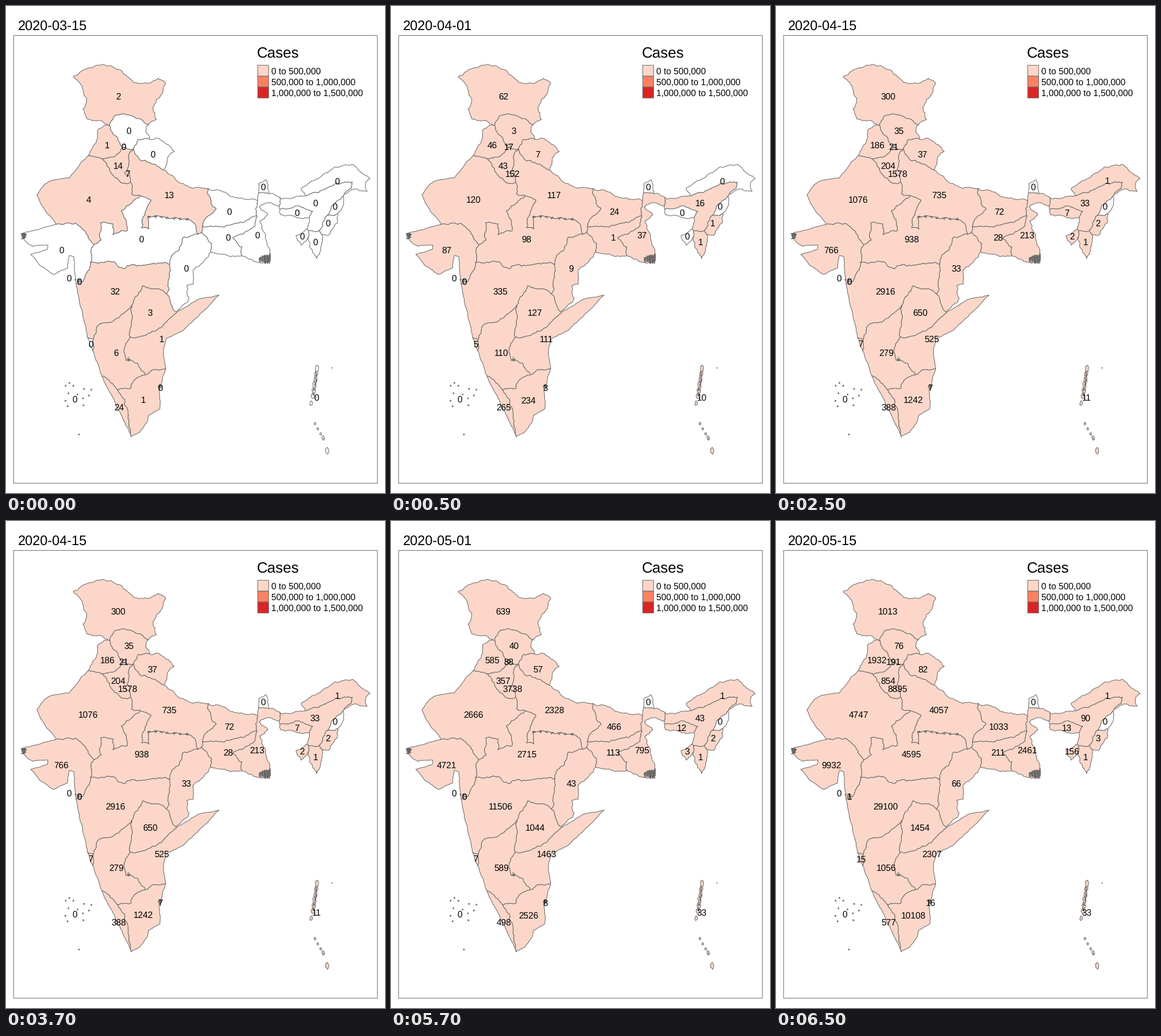
A matplotlib script for the animation above (8000 ms loop, 660x849 px).

```python
import numpy as np
import matplotlib.pyplot as plt
from matplotlib.animation import FuncAnimation
from matplotlib.patches import Polygon, Rectangle

W, H, DPI = 660, 849, 64
PX = 72 / DPI
EDGE = "#666666"
LOW, MID, HIGH = "#fcd7c9", "#fb8161", "#d92523"
DATES = ["2020-03-15", "2020-04-01", "2020-04-15", "2020-05-01", "2020-05-15"]

plt.rcParams.update({"font.family": "Liberation Sans", "text.hinting": "no_hinting",
                     "path.simplify": False})
rng = np.random.default_rng(4)
fig = plt.figure(figsize=(W / DPI, H / DPI), dpi=DPI, facecolor="white")
ax = fig.add_axes([0, 0, 1, 1])
ax.set(xlim=(0, W), ylim=(H, 0))
ax.axis("off")
regions = []


def border(*flat, rough=0.16):
    """Fractal line: midpoints are pushed sideways until the pieces are short."""
    pts = list(np.array(flat, float).reshape(-1, 2))
    while True:
        out = pts[:1]
        for a, b in zip(pts, pts[1:]):
            dx, dy = b - a
            length = np.hypot(dx, dy)
            if length > 3.5:
                push = rng.uniform(-1, 1) * min(rough * length, 14 * rough)
                out.append((a + b) / 2 + np.array([-dy, dx]) / length * push)
            out.append(b)
        if len(out) == len(pts):
            return np.array(pts)
        pts = out


def coast(*flat):
    return border(*flat, rough=0.07)


def gap(p, arc):
    return min(np.hypot(*(p - arc[0])), np.hypot(*(p - arc[-1])))


def ring(*arcs):
    """Join borders end to end, turning each one as needed."""
    path = arcs[0]
    if gap(path[0], arcs[1]) < gap(path[-1], arcs[1]):
        path = path[::-1]
    for arc in arcs[1:]:
        if np.hypot(*(path[-1] - arc[0])) > np.hypot(*(path[-1] - arc[-1])):
            arc = arc[::-1]
        path = np.vstack([path, arc])
    return path


def blob(x, y, rx, ry):
    a = np.linspace(0, 2 * np.pi, 14, endpoint=False)
    r = rng.uniform(0.65, 1.15, a.size)
    return np.column_stack([x + rx * r * np.cos(a), y + ry * r * np.sin(a)])


def write(x, y, text, size=15.5, ha="left"):
    return ax.text(x, y, text, size=size * PX, ha=ha, va="baseline", color="black", zorder=5)


def box(x, y, w, h, fill):
    ax.add_patch(Rectangle((x, y), w, h, fc=fill, ec=EDGE, lw=PX, snap=False))


def region(x, y, counts, *rings):
    shapes = [ax.add_patch(Polygon(r, closed=True, ec=EDGE, fc="white", lw=PX,
                                   joinstyle="round", zorder=2)) for r in rings]
    regions.append((shapes, write(x, y + 5.5, "", ha="center"), counts))


def scribble(x, y, rx, ry, n):
    ax.plot(x + rng.uniform(-rx, rx, n), y + rng.uniform(-ry, ry, n),
            color=EDGE, lw=0.8 * PX, zorder=3)


# Borders run between shared corners
jk_out = border(177, 207, 141, 197, 134, 180, 140, 160, 133, 140, 117, 123, 139, 110, 158, 103,
                183, 104, 202, 113, 222, 133, 252, 134, 265, 126, 278, 134, 272, 153, 256, 175,
                262, 198, 248, 207)
jk_hp = border(248, 207, 227, 196, 205, 188, 190, 191, 181, 209)
jk_pb = border(181, 209, 177, 207)
hp_out = border(248, 207, 243, 219, 250, 232)
hp_uk = border(250, 232, 230, 233, 222, 249)
hp_pb = border(181, 209, 190, 226, 205, 247)
hp_hr = border(205, 247, 222, 249)
pb_out = border(177, 207, 159, 218, 158, 233, 143, 261)
pb_rj = border(143, 261, 161, 264)
pb_hr = border(161, 264, 188, 263, 205, 247)
hr_rj = border(161, 264, 174, 273, 185, 294, 200, 308, 217, 307)
hr_up = border(217, 307, 211, 287, 213, 264, 222, 249)
uk_out = border(250, 232, 262, 230, 293, 253, 281, 265, 275, 286)
uk_up = border(275, 286, 263, 279, 236, 270, 222, 249)
rj_out = coast(143, 261, 130, 273, 110, 300, 80, 304, 67, 311, 54, 329, 64, 350, 87, 381)
rj_gj = border(87, 381, 122, 379, 137, 392, 153, 416)
rj_mp = border(153, 416, 166, 408, 165, 378, 186, 380, 186, 399, 211, 392, 209, 372, 201, 357,
               220, 343, 234, 331)
rj_up = border(217, 307, 219, 328, 234, 331)
up_mp = border(234, 331, 252, 338, 242, 364, 236, 387, 249, 389, 247, 367, 290, 370, 318, 373,
               331, 385, 334, 398)
up_cg = border(334, 398, 341, 394)
up_jh = border(341, 394, 342, 384)
up_br = border(342, 384, 350, 368, 366, 354, 357, 344, 352, 318)
up_out = border(352, 318, 325, 318, 295, 302, 275, 286)

br_out = border(352, 318, 371, 321, 398, 334, 438, 339)
br_wb = border(438, 339, 435, 354, 437, 366)
br_jh = border(342, 384, 383, 383, 405, 378, 418, 374, 437, 366)
jh_wb = border(437, 366, 434, 383, 412, 398, 395, 404, 411, 420, 411, 435)
jh_out = border(411, 435, 383, 434, 357, 429)
jh_cg = border(357, 429, 358, 414, 341, 394)
wb_out = border(438, 339, 440, 325)
wb_sk = border(440, 325, 458, 327)
wb_top = border(458, 327, 477, 334)
wb_as = border(477, 334, 476, 349)
wb_sea = border(476, 349, 455, 343, 441, 350, 456, 364, 442, 375, 452, 398, 460, 432, 458, 446,
                441, 447, 428, 442, 411, 435)
sk_out = border(440, 325, 440, 310, 453, 303, 458, 327)
as_top = border(477, 334, 522, 331)
as_ar = border(522, 331, 545, 325, 575, 309, 603, 307, 601, 318, 586, 332)
ar_out = border(522, 331, 514, 318, 535, 304, 560, 291, 572, 281, 604, 276, 614, 287, 634, 301,
                626, 312, 629, 323, 606, 319, 586, 332)
as_nl = border(586, 332, 572, 345, 557, 367)
as_mn = border(557, 367, 546, 391)
as_mz = border(546, 391, 527, 392)
as_tr = border(527, 392, 524, 389)
as_out = border(524, 389, 528, 369)
as_ml = border(528, 369, 534, 358, 511, 349, 477, 355)
as_west = border(477, 355, 476, 349)
ml_out = border(477, 355, 478, 364, 510, 369, 528, 369)
nl_mn = border(557, 367, 578, 362)
nl_out = border(578, 362, 588, 345, 586, 332)
mn_out = border(578, 362, 577, 378, 563, 399, 549, 397)
mn_mz = border(549, 397, 546, 391)
mz_out = border(549, 397, 551, 410, 541, 440, 534, 430, 527, 402)
mz_tr = border(527, 402, 527, 392)
tr_out = border(524, 389, 505, 400, 514, 417, 527, 402)

gj_out = coast(87, 381, 66, 386, 27, 397, 36, 412, 47, 419, 73, 417, 72, 424, 43, 433, 60, 453,
               83, 468, 107, 457, 110, 435, 118, 437, 122, 485)
gj_mh = border(122, 485, 134, 480, 145, 460, 147, 447)
gj_mp = border(147, 447, 148, 428, 153, 416)
mp_mh = border(147, 447, 186, 446, 205, 458, 220, 451, 285, 450)
mp_cg = border(285, 450, 290, 433, 301, 426, 309, 403, 334, 398)
cg_out = border(357, 429, 344, 446, 326, 460, 326, 485, 315, 487, 319, 510, 297, 534)
cg_mh = border(285, 450, 284, 494, 279, 502)
cg_ts = border(279, 502, 297, 534)
mh_ts = border(279, 502, 266, 493, 238, 488, 229, 505, 219, 522)
mh_ka = border(219, 522, 196, 544, 160, 557, 152, 581)
mh_sea = coast(122, 485, 130, 525, 142, 578)
ga_mh = border(142, 578, 152, 581)
ga_ka = border(152, 581, 151, 601)
ga_sea = coast(142, 578, 151, 601)
ka_sea = coast(151, 601, 167, 645)
ka_kl = border(167, 645, 194, 669)
ka_tn = border(194, 669, 218, 666, 222, 654, 243, 643)
ka_ap = border(216, 577, 207, 594, 209, 618, 230, 624, 243, 643)
ka_ts = border(219, 522, 218, 550, 216, 577)
ts_ap = border(216, 577, 240, 575, 270, 561, 297, 534)
ap_out = coast(297, 534, 333, 512, 371, 504, 335, 541, 309, 565, 279, 580, 274, 600, 278, 632)
ap_tn = border(243, 643, 258, 634, 278, 632)
tn_sea = coast(278, 632, 267, 668, 268, 702, 248, 714, 246, 725, 233, 743, 218, 751)
kl_tn = border(194, 669, 206, 685, 213, 715, 218, 751)
kl_sea = coast(167, 645, 185, 680, 218, 751)

# Regions: label position, count at each date, outline
NONE = [0] * 5
region(195.5, 157, [2, 62, 300, 639, 1013], ring(jk_out, jk_hp, jk_pb))
region(214, 217, [0, 3, 35, 40, 76], ring(jk_hp, hp_out, hp_uk, hp_hr, hp_pb))
region(176.5, 242, [1, 46, 186, 585, 1932], ring(jk_pb, pb_out, pb_rj, pb_hr, hp_pb))
region(255.5, 258, [0, 7, 37, 57, 82], ring(uk_out, uk_up, hp_uk))
region(195.5, 278.5, [14, 43, 204, 357, 854], ring(pb_hr, hr_rj, hr_up, hp_hr))
region(143.5, 337, [4, 120, 1076, 2666, 4747],
       ring(rj_out, rj_gj, rj_mp, rj_up, hr_rj, pb_rj))
region(284, 329.5, [13, 117, 735, 2328, 4057],
       ring(up_out, uk_up, hr_up, rj_up, up_mp, up_cg, up_jh, up_br))
region(388.5, 358, [0, 24, 72, 466, 1033], ring(br_out, br_wb, br_jh, up_br))
region(387, 403, [0, 1, 28, 113, 211], ring(br_jh, jh_wb, jh_out, jh_cg, up_jh))
region(437.5, 399.5, [0, 37, 213, 795, 2461],
       ring(wb_out, wb_sk, wb_top, wb_as, wb_sea, jh_wb, br_wb))
region(448, 315.5, NONE, ring(sk_out, wb_sk))
region(577, 305, [0, 0, 1, 1, 1], ring(ar_out, as_ar))
region(538.5, 343, [0, 16, 33, 43, 90],
       ring(as_top, as_ar, as_nl, as_mn, as_mz, as_tr, as_out, as_ml, as_west, wb_as))
region(506.5, 360.5, [0, 0, 7, 12, 13], ring(as_ml, ml_out))
region(572.5, 349.5, NONE, ring(as_nl, nl_mn, nl_out))
region(560.5, 378.5, [0, 1, 2, 2, 3], ring(nl_mn, mn_out, mn_mz, as_mn))
region(539, 411, [0, 1, 1, 1, 1], ring(as_mz, mn_mz, mz_out, mz_tr))
region(516, 401.5, [0, 0, 2, 3, 156], ring(as_tr, tr_out, mz_tr))
region(314, 457, [0, 9, 33, 43, 66], ring(cg_out, cg_ts, cg_mh, mp_cg, up_cg, jh_cg))
region(236, 406, [0, 98, 938, 2715, 4595], ring(rj_mp, up_mp, mp_cg, mp_mh, gj_mp))
region(96.5, 425, [0, 87, 766, 4721, 9932], ring(gj_out, gj_mh, gj_mp, rj_gj))
region(190.5, 497.5, [32, 335, 2916, 11506, 29100],
       ring(mh_sea, ga_mh, mh_ka, mh_ts, cg_mh, mp_mh, gj_mh))
region(251, 534, [3, 127, 650, 1044, 1454], ring(mh_ts, cg_ts, ts_ap, ka_ts))
region(271, 580.5, [1, 111, 525, 1463, 2307], ring(ts_ap, ap_out, ap_tn, ka_ap))
region(192, 604, [6, 110, 279, 589, 1056],
       ring(mh_ka, ka_ts, ka_ap, ka_tn, ka_kl, ka_sea, ga_ka))
region(148, 589, [0, 5, 7, 7, 15], ring(ga_mh, ga_ka, ga_sea))
region(196.5, 699.5, [24, 265, 388, 498, 577], ring(ka_kl, kl_tn, kl_sea))
region(239, 687, [1, 234, 1242, 2526, 10108], ring(ka_tn, ap_tn, tn_sea, kl_tn))
region(205, 245, [0, 17, 21, 88, 191], blob(205, 244, 3, 3))
region(212, 292, [7, 152, 1578, 3738, 8895], blob(211.5, 291, 5, 5))
region(109.5, 474, NONE, blob(121, 477, 1, 1.5))
region(128, 480.5, [0, 0, 0, 0, 1], blob(127.5, 480, 4, 4))
region(269, 665.5, [0, 3, 7, 8, 16], blob(268, 664, 3, 3.5))

# Island groups
atolls = [blob(x, y, 1, 1.2) for x, y in rng.uniform((100, 656), (149, 700), (12, 2))]
region(120, 685, NONE, blob(127, 747, 1, 1), *atolls)
chain = [blob(541.5 - 1.4 * k, 632 + 9.5 * k, 3, 5.5) for k in range(6)]
islets = [blob(538 + 5 * k, 728 + 9 * k, 1.7, 2.2) for k in range(4)]
region(541, 682.5, [0, 10, 11, 33, 33], *chain, *islets, blob(568, 631, 0.5, 0.5),
       blob(531.5, 692.5, 2.5, 4), blob(552, 752, 2.5, 3), blob(559, 775.5, 3, 5.5))
for k in range(5):
    scribble(541 - 1.4 * k, 642 + 9 * k, 2, 4, 7)

# River delta: ragged fingers, longer towards the east
for x in np.arange(441, 460.5, 1.2):
    top = 439 - (x - 441) * 0.35 + rng.uniform(-2, 2)
    ax.plot([x, x + rng.uniform(-1, 1)], [top, rng.uniform(444, 449)],
            color=EDGE, lw=1.5 * PX, zorder=3)

# Creeks and enclaves
scribble(31, 401, 5, 5, 45)
scribble(127.5, 480, 3, 3, 8)
scribble(268, 664, 2, 4, 14)
scribble(213, 616, 4, 4, 9)
for x in np.arange(249, 320, 11):
    scribble(x, 367 + (x - 249) / 13, 3, 2.5, 7)

# Frame, title and legend
box(13.2, 51.3, 633.6, 780.7, "none")
title = write(20.5, 43, "", 23.5)
write(437, 90, "Cases", 26)
legend = [(LOW, "0 to 500,000"), (MID, "500,000 to 1,000,000"),
          (HIGH, "1,000,000 to 1,500,000")]
for row, (color, text) in enumerate(legend):
    y = 103.3 + 19 * row
    box(438.3, y, 19, 19, color)
    write(461.5, y + 15.2, text)


def shade(count):
    if count == 0:
        return "white"
    return (LOW, MID, HIGH)[min(count // 500_000, 2)]


def update(frame):
    step = (frame + 3) // 4
    title.set_text(DATES[step])
    for shapes, label, counts in regions:
        label.set_text(str(counts[step]))
        for shape in shapes:
            shape.set_facecolor(shade(counts[step]))


anim = FuncAnimation(fig, update, frames=16, interval=500, repeat=True, repeat_delay=0)
plt.show()
```
